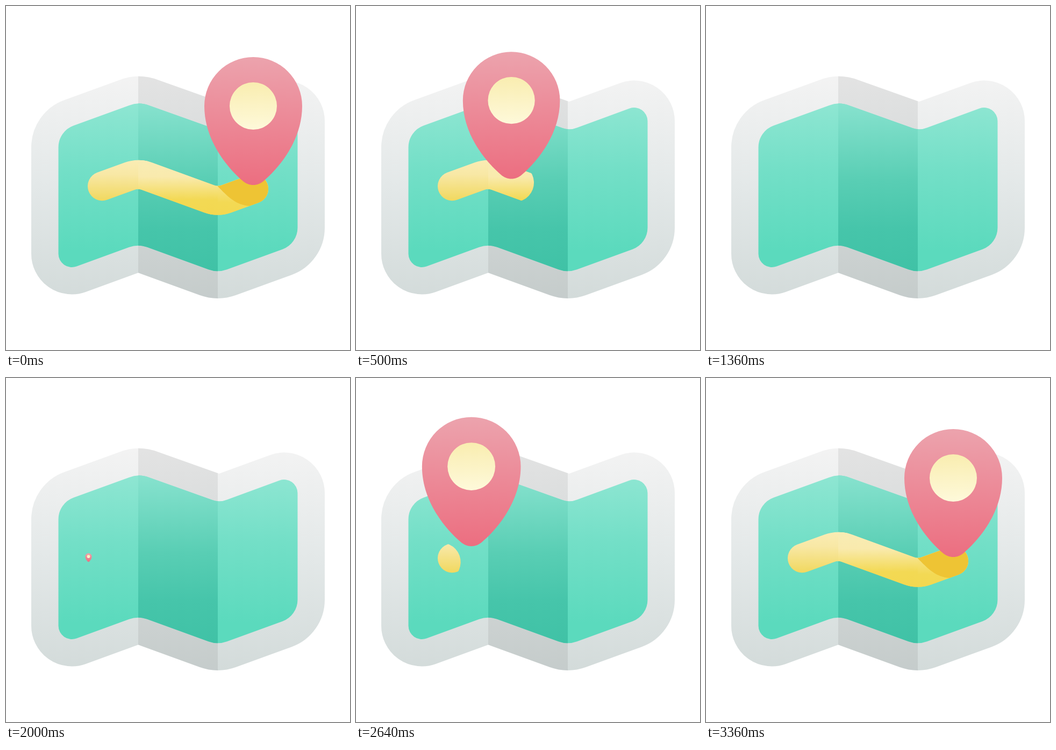
An HTML page that plays this animation: 640x640 px, repeating every 3.87 s.

```html
<!DOCTYPE html>
<html lang="en">
<head>
<meta charset="utf-8">
<title>Map route</title>
<style>
  html, body { margin: 0; width: 100%; height: 100%; overflow: hidden; background: #fff; }
  svg { display: block; width: 100vw; height: 100vh; }
</style>
</head>
<body>
<svg viewBox="0 0 640 640" fill="none">
  <defs id="defs">
    <path id="sheet" d="M97.5 263A43 43 0 0 1 125.8 222.5L229 184.9A50 50 0 0 1 262 183.6L384 227.1
      A38 38 0 0 0 411 226.4L509 190.6A25 25 0 0 1 542.5 214V412.4A43 43 0 0 1 514.2 452.8L411 490.3
      A50 50 0 0 1 377 490.3L263 448.8A50 50 0 0 0 229 448.8L131 484.5A25 25 0 0 1 97.5 461Z"/>
    <path id="route" stroke-width="54" stroke-linecap="round" d="M179 335.2L230 316.6A47 47 0 0 1 262 316.6
      L378 358.8A47 47 0 0 0 410 358.8L461 340.3"/>
    <clipPath id="middle"><path d="M246 0H394V640H246Z"/></clipPath>
    <clipPath id="right"><path d="M394 0H640V640H394Z"/></clipPath>
    <clipPath id="shade"><path d="M394 335.5C412 354 428 371 454 372L480 400H520V300H394Z"/></clipPath>
    <mask id="reveal" maskUnits="userSpaceOnUse" x="0" y="0" width="640" height="640">
      <path id="trail" stroke="#fff" stroke-width="72" stroke-linecap="round" d="M105 362.1L230 316.6
        A47 47 0 0 1 262 316.6L378 358.8A47 47 0 0 0 410 358.8L470 337"/>
    </mask>
  </defs>

  <use href="#sheet" stroke="url(#paper)" stroke-width="101"/>
  <use href="#sheet" stroke="#000" stroke-opacity=".065" stroke-width="101" clip-path="url(#middle)"/>
  <use href="#sheet" fill="url(#land)"/>
  <use href="#sheet" fill="url(#fold)" clip-path="url(#middle)"/>

  <g mask="url(#reveal)">
    <use href="#route" stroke="url(#roadLeft)"/>
    <use href="#route" stroke="url(#roadMiddle)" clip-path="url(#middle)"/>
    <use href="#route" stroke="url(#roadRight)" clip-path="url(#right)"/>
    <use href="#route" stroke="#eec434" clip-path="url(#shade)"/>
  </g>

  <g id="pin">
    <path fill="url(#body)" d="M-91-147.5A91 91 0 0 1 91-147.5C91-83.5 48-32.5 20-8.5
      C8 2.3-8 2.3-20-8.5C-48-32.5-91-83.5-91-147.5Z"/>
    <circle cy="-147.5" r="44" fill="url(#hole)"/>
  </g>
</svg>

<script>
const $ = id => document.getElementById(id);
const ns = 'http://www.w3.org/2000/svg';

function make(tag, attrs, parent) {
  const el = parent.appendChild(document.createElementNS(ns, tag));
  for (const key in attrs) el.setAttribute(key, attrs[key]);
  return el;
}

// Vertical gradient from y1 to y2; each stop is "colour offset"
function gradient(id, y1, y2, ...stops) {
  const g = make('linearGradient', { id, x1: 0, x2: 0, y1, y2, gradientUnits: 'userSpaceOnUse' }, $('defs'));
  for (const stop of stops) {
    const [color, offset] = stop.split(' ');
    make('stop', { offset, 'stop-color': color }, g);
  }
}
gradient('paper', 131, 544, '#f3f3f3 0', '#e3e8e8 .5', '#d3dbda 1');
gradient('land', 182, 456, '#8ee6d2 0', '#73dfc7 .45', '#5bdabd 1');
gradient('fold', 182, 493, '#87e2ce 0', '#59ceb4 .46', '#46c5aa .75', '#40c2a6 1');
gradient('roadLeft', 287, 362, '#faecb4 0', '#f8e8a5 .35', '#f1d85f 1');
gradient('roadMiddle', 287, 389, '#f8ecb4 0', '#f9eaad .3', '#f3d954 .72', '#f3d850 1');
gradient('roadRight', 330, 389, '#f7e38a 0', '#f3d954 .6', '#f3d850 1');
gradient('body', -238.5, 0, '#eca3ad 0', '#ec6e80 1');
gradient('hole', -191.5, -103.5, '#f9edb0 0', '#fef9da 1');

// Ease in and out from 0 to 1 between two times
function ease(t, from, to) {
  const u = Math.min(1, Math.max(0, (t - from) / (to - from)));
  return u * u * (3 - 2 * u);
}

const bezier = (u, a, b, c, d) => {
  const w = 1 - u;
  return a * w ** 3 + 3 * b * w * w * u + 3 * c * w * u * u + d * u ** 3;
};

const loop = 3870, step = 1000 / 14;
const trail = $('trail'), pin = $('pin');
const trailLength = trail.getTotalLength();

// Pin shrinks along a long tail, then later pops up past full size and settles
function pinSize(t) {
  if (t < 1350) return 1 / (1 + (Math.max(0, t - 430) / 280) ** 3.5);
  return 1.067 * ease(t, 1935, 2360) - .067 * ease(t, 2360, 2730);
}

function draw(ms) {
  const t = Math.floor((ms % loop + 5) / step) * step;
  const along = 1 - ease(t, 60, 880) + ease(t, 2400, 3350);
  const shown = 1 - ease(t, 60, 965) + ease(t, 2400, 3400);
  const x = bezier(along, 153.5, 300, 300, 460);
  const y = bezier(along, 342, 247, 402, 333.5);
  pin.setAttribute('transform', `translate(${x} ${y}) scale(${pinSize(t)})`);
  trail.setAttribute('stroke-dasharray', `${shown * trailLength} 2000`);
}

const start = performance.now();
function tick() {
  draw(performance.now() - start);
  requestAnimationFrame(tick);
}
tick();
</script>
</body>
</html>
```
